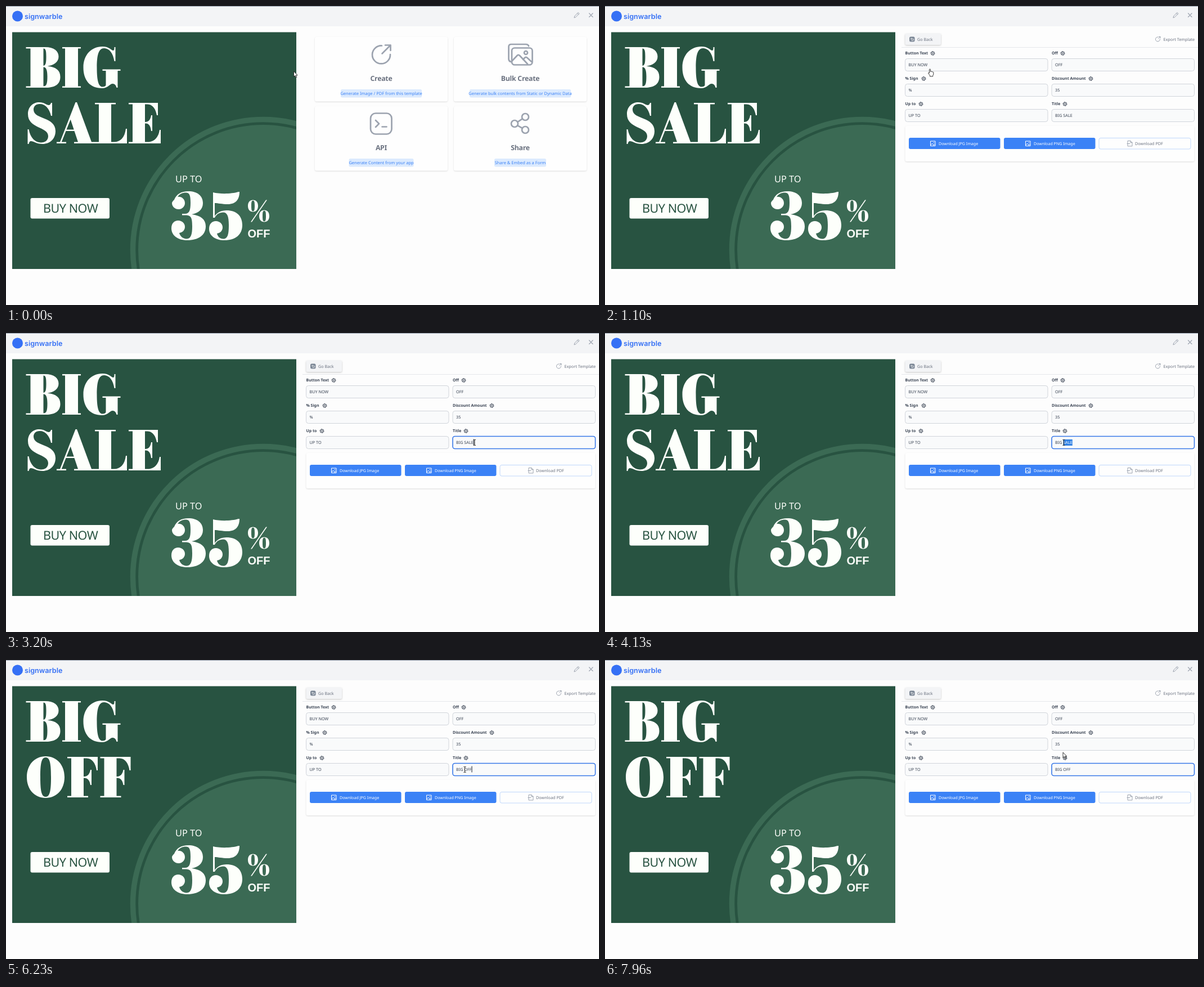
Animation, 1054 px wide and 531 px high, one loop 8 s. Source, as an HTML page:

```html
<!DOCTYPE html>
<html lang="en">
<head>
<meta charset="utf-8">
<title>Banner template editor</title>
<style>
html, body { margin: 0; width: 100%; height: 100%; overflow: hidden; background: #fdfdfd; }
svg { display: block; width: 1054px; height: 531px; }
text { font-family: "Noto Sans", "Open Sans", sans-serif; font-size: 7.25px; fill: #374151; white-space: pre; text-rendering: geometricPrecision; }
.logo { font: 600 12.6px Inter, sans-serif; fill: #3570f5; }
.head { font-size: 12.3px; font-weight: 600; letter-spacing: -.25px; fill: #6b7280; text-anchor: middle; }
.chip { font-size: 7.5px; fill: #3b82f6; text-anchor: middle; }
.label { font-size: 6.95px; font-weight: 600; }
.button { font-size: 7.1px; font-weight: 500; fill: #fff; }
.muted { fill: #6b7280; }
.upto { font-size: 16.3px; fill: #fdfffb; }
.buy { font-size: 21.6px; font-weight: 500; letter-spacing: -.5px; fill: #285341; }
.off { font: 700 20px "Liberation Sans", sans-serif; fill: #fdfffb; }
.card { fill: #fefefe; filter: drop-shadow(0 1px 1px rgba(0,0,0,.13)); }
.card.hover { filter: drop-shadow(0 1px 2px rgba(0,0,0,.28)); }
.icon { fill: none; stroke: #9ca3af; stroke-width: 2.7; stroke-linecap: round; stroke-linejoin: round; }
.thin { stroke-width: 1; }
.field { fill: #f9fafb; stroke: #d1d5db; }
.field.focus { stroke: #3878e8; stroke-width: 1.6; }
</style>
</head>
<body>
<svg id="stage" viewBox="0 0 1054 531"></svg>
<script>
const LOOP = 8000, FORM_AT = 1100;
const stage = document.getElementById("stage");

// Display letters: cap height 72, baseline at 72; digits are 87 tall.
const GLYPHS = {
  B: "M0 0H34C50 0 58 7 58 17C58 27 49 32 38 34C53 35 61 41 61 53C61 66 51 72 36 72H0V69.5H8V2.5H0ZM31 2.5V33C35 33 36 28 36 17C36 6 35 2.5 31 2.5ZM31 35.5V69.5C37 69.5 38 64 38 52C38 41 36 35.5 31 35.5Z",
  I: "M0 0H33V2.5H28V69.5H33V72H0V69.5H5V2.5H0Z",
  G: "M55 0H57V25H55C53 11 46 2 37 2C27 2 24 14 24 36C24 60 27 70.5 34 70.5C38 70.5 40 69 40 67V42H34V39.5H66V42H61V72H59C58 68 56 65 52 65C47 65 44 73 33 73C12 73 0 59 0 36C0 14 14 -1 34 -1C46 -1 50 6 53 6C55 6 55 3 55 0Z",
  O: "M33.5 -1C53 -1 67 14 67 36S53 73 33.5 73S0 58 0 36S14 -1 33.5 -1ZM33.5 1C26 1 24 12 24 36S26 71 33.5 71S43 60 43 36S41 1 33.5 1Z",
  S: "M42 0H44V23H42C39 10 32 2 22 2C15 2 11 6 11 12C11 30 50 24 50 50C50 64 40 73 27 73C16 73 11 68 6.5 68C4 68 3 70 2.5 73H.5V47H2.5C5 62 14 70.5 24 70.5C32 70.5 37 66 37 59C37 42 1 46 1 20C1 7 10 -1 21 -1C30 -1 34 4 38 4C40 4 41.5 2 42 0Z",
  A: "M33.5 -1H36L62 69.5H68V72H31V69.5H38L31.5 50H16.5L8.8 69.5H17V72H0V69.5H6ZM24.7 29.5L17.5 47.5H30.7Z",
  L: "M0 0H37V2.5H29V69.5H34C45 69.5 53 62 55 46H57V72H0V69.5H7V2.5H0Z",
  E: "M0 0H52V22H50C48 10 42 2.5 33 2.5H29V34H30C36 34 39 29 40 22H42V50H40C39 41 36 36.5 30 36.5H29V69.5H34C45 69.5 53 62 55 48H57V72H0V69.5H7V2.5H0Z",
  F: "M0 0H54V24H52C50 11 44 2.5 34 2.5H29V35H30C36 35 40 30 41 23H43V50H41C40 42 36 37.5 30 37.5H29V69.5H37V72H0V69.5H7V2.5H0Z",
  3: "M5 15C9 5 18 0 30 0C46 0 56 8 56 21C56 32 48 39 36 41C52 43 61 50 61 62C61 78 48 87 28 87C11 87 0 78 0 66C0 57 5 52 12 52C19 52 24 57 24 63C24 69 20 73 14 74C15 79 20 84.5 27 84.5C35 84.5 37 76 37 62C37 47 35 42.5 25 42.5H19V40H24C32 40 34 34 34 20C34 7 32 2.5 26 2.5C19 2.5 14 5 11 10C18 9 24 14 24 21C24 27 19 32 13 32C6 32 1 27 1 21C1 19 3 17 5 15Z",
  5: "M7 2C18 5 40 5 52 1H54C54 14 48 23 33 23C23 23 16 21 10 21V44C14 38 21 34 31 34C49 34 59 44 59 60C59 77 47 87 27 87C11 87 0 79 0 67C0 58 5 53 12 53C19 53 24 58 24 64C24 70 20 74 14 75C15 80 19 84.5 25 84.5C33 84.5 35 77 35 60C35 44 32 37.5 25 37.5C18 37.5 13 41 10 47H7Z",
  "%": "M9 0C14.500 0 18 4 18 10.500S14.500 21 9 21S0 17 0 10.500S3.500 0 9 0ZM9 1C6.500 1 6 4 6 10.500S6.500 20 9 20S12 17 12 10.500S11.500 1 9 1ZM29 18C34.500 18 38 22 38 28.500S34.500 39 29 39S20 35 20 28.500S23.500 18 29 18ZM29 19C26.500 19 26 22 26 28.500S26.500 38 29 38S32 35 32 28.500S31.500 19 29 19ZM32 0H34L7 39H5Z"
};

const text = (x, y, cls, s) => `<text x="${x}" y="${y}" class="${cls}">${s}</text>`;
const rect = (x, y, w, h, r, attrs) => `<rect x="${x}" y="${y}" width="${w}" height="${h}" rx="${r}" ${attrs}/>`;
const path = (d, attrs) => `<path d="${d}" ${attrs}/>`;
const circle = (x, y, r, attrs = "") => `<circle cx="${x}" cy="${y}" r="${r}" ${attrs}/>`;
const at = (x, y, body, attrs = "") => `<g transform="translate(${x} ${y})" ${attrs}>${body}</g>`;

// Places letters of a word at the given left edges.
const letters = (word, xs, y, id = "") =>
  `<g ${id && `id="${id}"`} role="img" aria-label="${word}" fill="#fdfffb" fill-rule="evenodd">` +
  [...word].map((c, i) => at(xs[i], y, path(GLYPHS[c], ""))).join("") + "</g>";

const header = rect(0, 0, 1054, 36, 0, 'fill="#f3f4f6"') + rect(0, 0, 1054, 1, 0, 'fill="#8f9aa8"') +
  circle(20.5, 18, 9.5, 'fill="#3570f5"') + text(33, 22.5, "logo", "signwarble") +
  path("M1010 20.500L1010.800 17.800L1017 11.500L1019 13.500L1012.700 19.700ZM1015.500 13L1017.500 15", 'class="icon thin"') +
  path("M1036.500 13L1043 19.500M1043 13L1036.500 19.500", 'class="icon" style="stroke-width:1.2"');

const poster = '<clipPath id="frame"><rect x="11" y="46.5" width="505" height="420.500"/></clipPath><g clip-path="url(#frame)">' +
  rect(11, 46, 505, 422, 0, 'fill="#285341"') +
  circle(457, 433, 231.5, 'fill="none" stroke="#3b6a54" stroke-width="9.5"') +
  circle(457, 433, 222, 'fill="#3b6a54"') +
  letters("BIG", [35.5, 100, 137.5], 73) +
  letters("O", [228], 73, "wideO") +
  letters("SALE", [38, 90, 158, 218], 172, "sale") +
  letters("OFF", [37, 109, 167.5], 172, "offWord") +
  rect(43.5, 341, 140.5, 36.5, 3, 'fill="#fdfffb"') + text(66, 367, "buy", "BUY NOW") +
  text(301, 312.5, "upto", "UP TO") + letters("35", [294, 361], 329) +
  letters("%", [430], 344.5) + text(429.5, 411, "off", "OFF") + "</g>";

const icons = {
  create: path("M668 70.500A16 16 0 1 0 683 86M668.500 84.500L683.500 69.500M674 69.500H683.500V79", 'class="icon"'),
  bulk: rect(899, 74.5, 36.5, 30, 5, 'class="icon"') + circle(924, 83, 3, 'class="icon"') +
    path("M897 99Q893.500 98 893.500 94V72.500Q893.500 68 898 68H924Q928 68 929 71M900 97L909 87.500Q911 86 913 88L927 103M919 95L922.500 91.500Q924.500 90 926.500 92L934 99", 'class="icon"'),
  api: rect(648, 190.5, 37.5, 37, 9, 'class="icon"') + path("M657 203L663 209L657 215M668.500 214.500H676.500", 'class="icon"'),
  share: circle(923, 197, 6, 'class="icon"') + circle(904, 209, 6, 'class="icon"') + circle(923, 220, 6, 'class="icon"') +
    path("M909.500 205.800L917.700 200.300M909.500 212.300L917.700 217", 'class="icon"')
};

const card = (x, y, icon, title, note, chipW) => {
  const mid = x + 118;
  return rect(x, y, 236, 114.5, 3, 'class="card"') + icons[icon] + text(mid, y + 78, "head", title) +
    rect(mid - chipW / 2, y + 93, chipW, 14.5, 2.5, 'fill="#dbeafe"') + text(mid, y + 102.8, "chip", note);
};
const menu = card(549, 55, "create", "Create", "Generate Image / PDF from this template", 144) +
  card(796, 55, "bulk", "Bulk Create", "Generate bulk contents from Static or Dynamic Data", 180) +
  card(549, 178, "api", "API", "Generate Content from your app", 115) +
  card(796, 178, "share", "Share", "Share &amp; Embed as a Form", 92);

const gear = (x, y) => circle(x, y, 2.9, 'fill="none" stroke="#374151" stroke-width="1"') +
  circle(x, y, 3.5, 'fill="none" stroke="#374151" stroke-width=".9" stroke-dasharray="1.6 2.065"') +
  circle(x, y, 1, 'fill="none" stroke="#374151" stroke-width=".8"');

const COLS = [533.5, 794], ROWS = [93.5, 138.5, 183.5], FIELD_W = 253.5, FIELD_H = 22;
const field = (col, row, label, gearX, value) => {
  const x = COLS[col], y = ROWS[row], last = label === "Title";
  return text(x, y - 7.6, "label", label) + gear(gearX, y - 9.5) +
    rect(x, y, FIELD_W, FIELD_H, 4, `class="field" ${last ? 'id="titleBox"' : ""}`) +
    (last ? "" : text(x + 6, y + 13.2, "", value));
};

const pictureIcon = x => at(x, 239.5, path("M1 .5H9.500V9H1ZM1.500 7.500L4 4.500L7.500 8.500M6.500 7L7.800 5.800L9.500 7.500", 'fill="none" stroke="#fff" stroke-linejoin="round"') + circle(7, 3, .8, 'fill="#fff"'));
const blueButton = (x, label) => rect(x, 234, 162.5, 20, 3, 'fill="#3b82f6"') + pictureIcon(x + 37.5) + text(x + 53, 246.8, "button", label);

const form = rect(533.5, 49, 63.5, 20, 2.5, 'fill="#f3f4f6" style="filter:drop-shadow(0 1px 1.500px rgba(0,0,0,.22))"') +
  rect(541, 54.5, 9.5, 9, 2.5, 'fill="#7c8796"') +
  path("M545 56.800L543.500 58.200L545 59.600M543.800 58.200H547Q548.500 58.200 548.500 59.700T547 61.200H544.500", 'fill="none" stroke="#fff" stroke-width=".8"') +
  text(555, 61.8, "muted", "Go Back") +
  path("M983 55A4 4 0 1 0 986.500 59M983.500 58L987 54.500M984.500 54.500H987V57", 'class="icon thin"') +
  text(992.5, 61.8, "muted", "Export Template") + rect(527, 73, 527, 1, 0, 'fill="#e5e7eb"') +
  rect(533.5, 213, 514, 63, 3, 'class="card"') +
  field(0, 0, "Button Text", 582.5, "BUY NOW") + field(1, 0, "Off", 813.5, "OFF") +
  field(0, 1, "% Sign", 566.5, "%") + field(1, 1, "Discount Amount", 863.5, "35") +
  field(0, 2, "Up to", 561.5, "UP TO") + field(1, 2, "Title", 817.5) +
  '<rect id="mark" y="189" height="11" fill="#2f80e4"/>' +
  '<text x="800" y="196.700"><tspan id="plain"></tspan><tspan id="picked" fill="#fff"></tspan></text>' +
  '<rect id="caret" y="188.500" width="1" height="11" fill="#111827"/>' +
  blueButton(540, "Download JPG Image") + blueButton(709, "Download PNG Image") +
  rect(878, 234.5, 163, 19.5, 3, 'fill="#fefefe" stroke="#bfd7fb"') +
  path("M929 248.500V239.500H934L937 242.500V248.500ZM934 239.500V242.500H937M928 244.500H933", 'class="icon thin"') +
  text(942, 246.8, "muted", "Download PDF");

const cursors = {
  arrow: path("M0 0V9.500L2.200 7.500L3.800 11L5.300 10.300L3.800 7H6.700Z", 'fill="#fff" stroke="#222" stroke-width=".9"'),
  hand: path("M-1 1Q0 -.3 1 1V5Q2 4 3 5.200Q4 4.500 4.700 5.700Q6 5.200 6.300 6.700V9.500Q6 11 5.200 12V13.500H0V12Q-1.500 10 -3 7.500Q-2.500 6 -1 7.500Z", 'fill="#fff" stroke="#222" stroke-width=".9" stroke-linejoin="round"'),
  beam: path("M-2 -5H-.5L0 -4.500L.5 -5H2M0 -4.500V4.500M-2 5H-.5L0 4.500L.5 5H2", 'fill="none" stroke="#222" stroke-width="1"')
};

stage.innerHTML = header + poster + `<g id="menu">${menu}</g><g id="form">${form}</g><g id="cursor">` +
  Object.keys(cursors).map(k => `<g id="${k}">${cursors[k]}</g>`).join("") + "</g>";

const el = id => document.getElementById(id);
const show = (id, on) => el(id).style.display = on ? "" : "none";
const firstCard = stage.querySelector("#menu .card");
const plain = el("plain"), picked = el("picked"), line = plain.parentNode;

// Pointer path: time, x, y
const MOVES = [[0, 511.5, 116], [30, 511.5, 116], [330, 577.5, 111.5], [2030, 577.5, 111.5], [2360, 704, 173],
  [2600, 784, 189], [2860, 842, 194.5], [3000, 842, 194.5], [3500, 819.5, 194.5], [3730, 819.5, 194.5],
  [4130, 815.5, 194.5], [7300, 815.5, 194.5], [7460, 825, 190], [7640, 825, 190], [7660, 826.5, 189],
  [7770, 826.5, 189], [7960, 814, 164], [LOOP, 814, 164]];

function pointer(t) {
  const i = MOVES.findIndex(m => m[0] > t), [t0, x0, y0] = MOVES[i - 1], [t1, x1, y1] = MOVES[i];
  const k = (t - t0) / (t1 - t0);
  return [x0 + (x1 - x0) * k, y0 + (y1 - y0) * k];
}

function pointerKind(t, x, y) {
  if (t < FORM_AT) return x > 549 ? "hand" : "arrow";
  if (t < 2060) return "hand";
  const within = (v, starts, size) => starts.some(s => v >= s && v <= s + size);
  return within(x, COLS, FIELD_W) && within(y, ROWS, FIELD_H) ? "beam" : "arrow";
}

const typed = t => t < 5860 ? "BIG SALE" : "BIG OFF".slice(0, t < 6060 ? 5 : t < 6230 ? 6 : 7);

function drawTitle(t, x) {
  const value = typed(t);
  plain.textContent = value;
  picked.textContent = "";
  const end = 800 + line.getComputedTextLength();
  const selecting = t >= 3030 && t < 5860;
  let from = value.length, startX = end;
  if (selecting) {
    for (let i = 4; i < value.length; i++) {
      const edge = line.getStartPositionOfChar(i).x;
      if (Math.abs(edge - x) < Math.abs(startX - x)) { from = i; startX = edge; }
    }
    plain.textContent = value.slice(0, from);
    picked.textContent = value.slice(from);
  }
  el("mark").setAttribute("x", startX);
  el("mark").setAttribute("width", end - startX);
  el("caret").setAttribute("x", end);
  const blink = t >= 5860 && t < 6800 || t >= 7330 && t < 7860;
  show("caret", blink || selecting && from === value.length);
  el("titleBox").classList.toggle("focus", t >= 3030);
}

function draw(t) {
  const [x, y] = pointer(t), kind = pointerKind(t, x, y);
  show("menu", t < FORM_AT);
  show("form", t >= FORM_AT);
  firstCard.classList.toggle("hover", kind === "hand");
  show("sale", t < 5860);
  show("wideO", t >= 5860 && t < 6060);
  show("offWord", t >= 6060);
  el("offWord").lastChild.style.display = t >= 6230 ? "" : "none";
  if (t >= FORM_AT) drawTitle(t, x);
  el("cursor").setAttribute("transform", `translate(${x} ${y})`);
  Object.keys(cursors).forEach(k => show(k, k === kind));
}

const begin = performance.now();
function tick() {
  draw((performance.now() - begin) % LOOP);
  requestAnimationFrame(tick);
}
tick();
</script>
</body>
</html>
```
